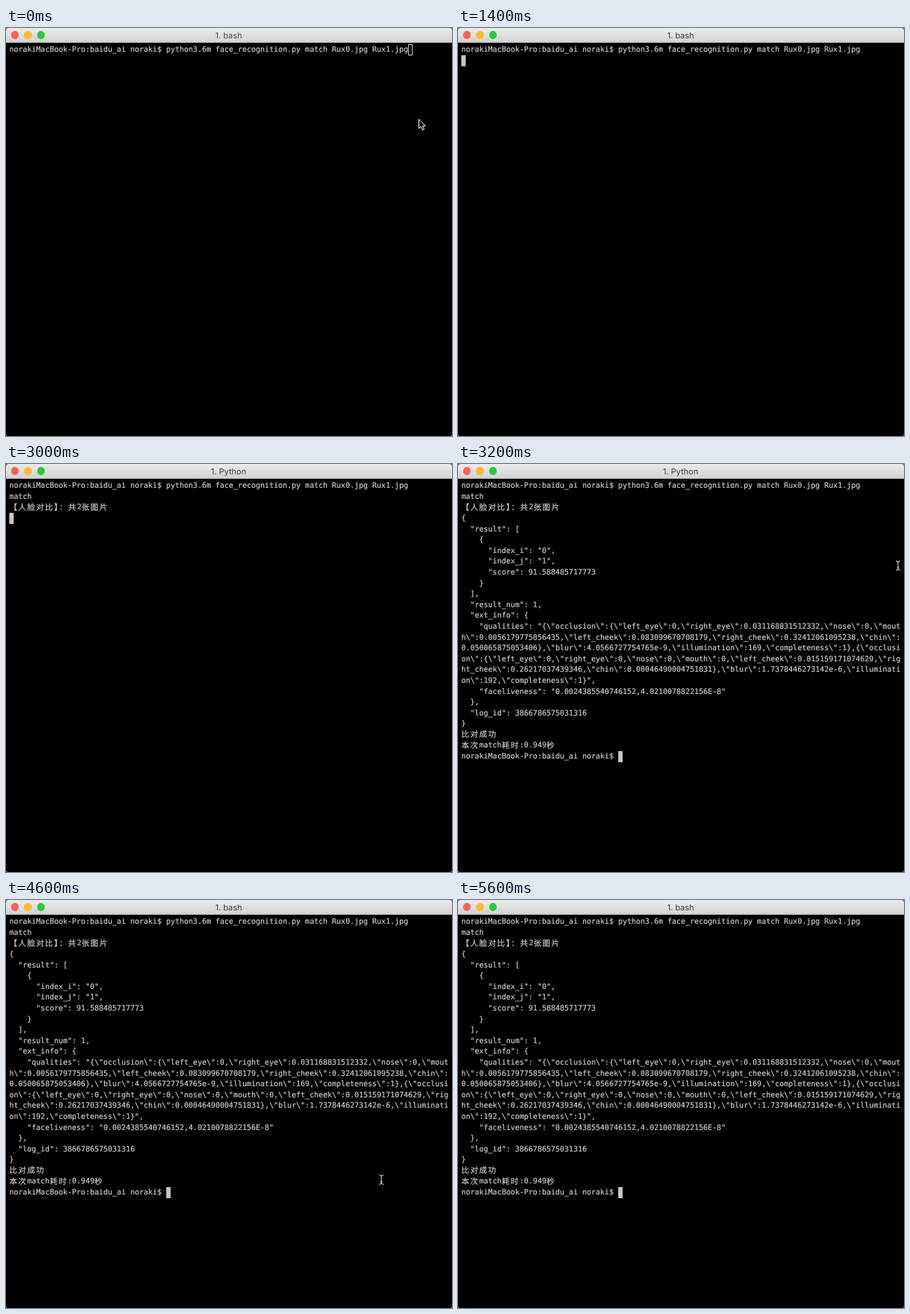
An HTML page for the animation above (6000 ms loop, 600x550 px).

```html
<!DOCTYPE html>
<html lang="zh-CN">
<head>
<meta charset="utf-8">
<title>Terminal</title>
<style>
  html, body { margin: 0; width: 100%; height: 100%; overflow: hidden; background: #8a8a8a; }

  .window {
    position: absolute; left: 0; top: 0; width: 600px; height: 550px;
    overflow: hidden; background: #000; border-radius: 4px 4px 3px 3px;
    --row: 14.6px;
    --top: 23.2px;
  }

  .bar {
    position: absolute; left: 0; top: 0; width: 600px; height: 20px;
    box-sizing: border-box; border-bottom: 1px solid #b4b4b4;
    background: linear-gradient(#ececec, #d2d2d2);
  }
  .light { position: absolute; top: 4.3px; width: 10.4px; height: 10.4px; border-radius: 50%; }
  .title {
    position: absolute; left: 0; top: 0; width: 599px; text-align: center;
    font: 11px/20px Inter, "Open Sans", sans-serif; color: #3c3c3c;
    text-rendering: geometricPrecision;
  }

  pre {
    position: absolute; left: 4.4px; top: var(--top); margin: 0;
    font: 10.02px/var(--row) "DejaVu Sans Mono", monospace;
    color: #cbcbcb; -webkit-text-stroke: .2px #cbcbcb;
    white-space: pre; text-rendering: geometricPrecision;
    font-variant-ligatures: none;
  }
  pre i {
    position: relative; top: .6px;
    font: 10.6px/0 "Noto Sans CJK SC", "Noto Sans CJK", sans-serif;
    letter-spacing: 1.46px; font-feature-settings: "halt" 0, "chws" 0;
  }
  .start { top: calc(var(--top) + var(--row)); }
  .report { top: calc(var(--top) + 3 * var(--row)); }

  .caret {
    position: absolute; left: 4px; top: 22px; width: 6px; height: 14.6px;
    box-sizing: border-box; border: 1px solid #c7c7c7;
  }
  svg { position: absolute; left: 0; top: 0; overflow: visible; }

  /* One shared loop, all changes are hard cuts. */
  .bash, .python, .start, .report, .caret, .arrow, .beam { animation: 6s step-end infinite; }
  .bash   { animation-name: bash; }
  .python { animation-name: python; }
  .start  { animation-name: start; }
  .report { animation-name: report; }
  .caret  { animation-name: caret; }
  .arrow  { animation-name: arrow; }
  .beam   { animation-name: beam; }

  @keyframes bash {
    0% { opacity: 1; color: #4c4c4c; }
    16.66% { opacity: 1; color: #3c3c3c; }
    30% { opacity: 0; }
    60%, 100% { opacity: 1; color: #3c3c3c; }
  }
  @keyframes python {
    0% { opacity: 0; }
    30% { opacity: 1; }
    60%, 100% { opacity: 0; }
  }
  @keyframes start {
    0% { opacity: 0; }
    33.33%, 100% { opacity: 1; }
  }
  @keyframes report {
    0% { opacity: 0; }
    53.33%, 100% { opacity: 1; }
  }
  @keyframes caret {
    0% { transform: translate(537px, 0); background: transparent; }
    16.66% { transform: translate(537px, 0); background: #c7c7c7; }
    23.33% { transform: translate(.4px, 14.6px); background: #c7c7c7; }
    33.33% { transform: translate(.4px, 43.8px); background: #c7c7c7; }
    53.33%, 100% { transform: translate(211.5px, 365px); background: #c7c7c7; }
  }
  @keyframes arrow {
    0% { opacity: 1; }
    13.33%, 100% { opacity: 0; }
  }
  @keyframes beam {
    0% { opacity: 0; transform: translate(555.5px, 123.5px); }
    13.33% { opacity: 1; transform: translate(555.5px, 123.5px); }
    20% { opacity: 0; transform: translate(555.5px, 123.5px); }
    53.33% { opacity: 1; transform: translate(592px, 137px); }
    56.66% { opacity: 1; transform: translate(508.5px, 271px); }
    66.66% { opacity: 1; transform: translate(508.5px, 309px); }
    70% { opacity: 1; transform: translate(505px, 373px); }
    76.66% { opacity: 1; transform: translate(505px, 377px); }
    80% { opacity: 1; transform: translate(525.5px, 454px); }
    83.33% { opacity: 1; transform: translate(545.5px, 505px); }
    86.66% { opacity: 1; transform: translate(559.5px, 545px); }
    90%, 100% { opacity: 0; transform: translate(559.5px, 560px); }
  }
</style>
</head>
<body>
<div class="window">
  <div class="bar">
    <div class="light" style="left:6.9px;background:#fc605b"></div>
    <div class="light" style="left:24.2px;background:#fdbc2f"></div>
    <div class="light" style="left:41.5px;background:#28c941"></div>
    <div class="title bash">1. bash</div>
    <div class="title python">1. Python</div>
  </div>

  <pre>norakiMacBook-Pro:baidu_ai noraki$ python3.6m face_recognition.py match Rux0.jpg Rux1.jpg</pre>
  <pre class="start">match
<i>【人脸对比】：共</i>2<i>张图片</i></pre>
  <pre class="report">{
  "result": [
    {
      "index_i": "0",
      "index_j": "1",
      "score": 91.588485717773
    }
  ],
  "result_num": 1,
  "ext_info": {
    "qualities": "{\"occlusion\":{\"left_eye\":0,\"right_eye\":0.031168831512332,\"nose\":0,\"mout
h\":0.0056179775856435,\"left_cheek\":0.083099670708179,\"right_cheek\":0.32412061095238,\"chin\":
0.050065875053406},\"blur\":4.0566727754765e-9,\"illumination\":169,\"completeness\":1},{\"occlusi
on\":{\"left_eye\":0,\"right_eye\":0,\"nose\":0,\"mouth\":0,\"left_cheek\":0.015159171074629,\"rig
ht_cheek\":0.26217037439346,\"chin\":0.00046490004751831},\"blur\":1.7378446273142e-6,\"illuminati
on\":192,\"completeness\":1}",
    "faceliveness": "0.0024385540746152,4.0210078822156E-8"
  },
  "log_id": 3866786575031316
}
<i>比对成功</i>
<i>本次</i>match<i>耗时</i>:0.949<i>秒</i>
norakiMacBook-Pro:baidu_ai noraki$ </pre>

  <div class="caret"></div>

  <svg width="600" height="550" fill="none" stroke="#fff">
    <path class="arrow" d="M555.5 123v12.4l2.9-2.7 2.1 4.8 2-.9-2.1-4.6h4z" fill="#000"/>
    <path class="beam" d="M-3-6.3Q0-6.3 0-4.3Q0-6.3 3-6.3M0-4.5V4.5M-3 6.3Q0 6.3 0 4.3Q0 6.3 3 6.3M-1.5 2.8H1.5" stroke-width=".9"/>
  </svg>
</div>
</body>
</html>
```
